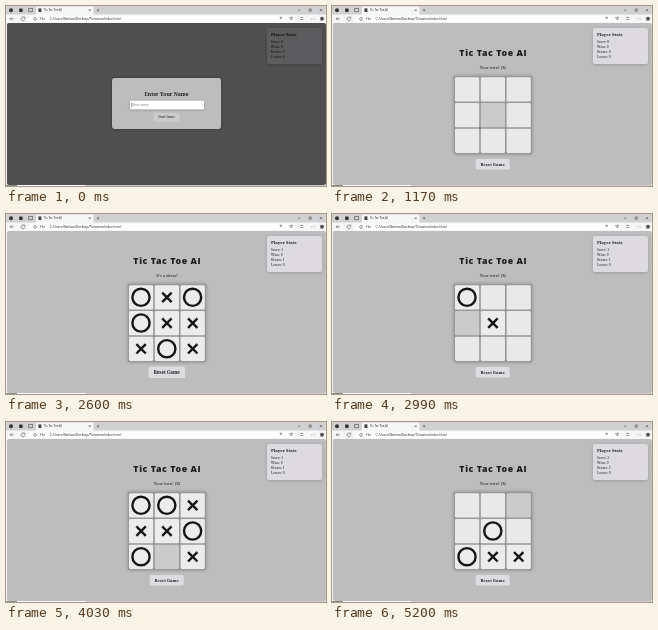
An HTML page for the animation above (5330 ms loop, 320 px wide and 180 px high).

```html
<!DOCTYPE html>
<html lang="en">
<head>
<meta charset="utf-8">
<title>Tic Tac Toe AI</title>
<style>
html, body { margin: 0; width: 100%; height: 100%; overflow: hidden; background: #d0d1d2; }
svg { display: block; width: 100vw; height: 100vh; }
text { font-family: "Noto Serif", serif; fill: #1f1f1f; white-space: pre; }
.ui { font-family: "Open Sans", sans-serif; }
.b { font-weight: 700; }
.mid { text-anchor: middle; }
.line { fill: none; stroke: #444; stroke-width: .55; }
</style>
</head>
<body>
<svg viewBox="0 0 320 180" preserveAspectRatio="none">
  <defs>
    <filter id="soft" x="-20%" y="-20%" width="140%" height="140%">
      <feDropShadow dx="0" dy=".8" stdDeviation="1.6" flood-color="#000" flood-opacity=".2"/>
    </filter>
    <filter id="glow" x="-20%" y="-20%" width="140%" height="140%">
      <feDropShadow dx="0" dy="0" stdDeviation="1.5" flood-color="#000" flood-opacity=".35"/>
    </filter>
  </defs>

  <!-- browser frame -->
  <rect width="320" height="180" fill="#d0d1d2"/>
  <path d="M0 8.5H320V180H0Z" fill="#f5f6f7"/>
  <path d="M30 9V2Q30 .5 31.5 .5H86Q87.5 .5 87.5 2V9Z" fill="#f5f6f7"/>
  <circle cx="5" cy="4.2" r="2" fill="#333"/>
  <rect x="13.2" y="2.6" width="3.4" height="3.4" rx=".6" fill="#333"/>
  <rect x="22.8" y="2.6" width="3.6" height="3.2" class="line"/>
  <rect x="32.4" y="2.4" width="3" height="3.6" fill="#444"/>
  <text class="ui" x="38" y="5.4" font-size="2.9">Tic Tac Toe AI</text>
  <path class="line" d="M82.7 3.2l2 2m0-2l-2 2M90.8 4.2h2.6m-1.3-1.3v2.6M292 4.2h2.4M303 3h2.3v2.3H303ZM313.8 3l2.4 2.4m0-2.4l-2.4 2.4"/>
  <rect x="23" y="9.7" width="266" height="6.4" rx="3.2" fill="#fff"/>
  <path class="line" d="M8 12.8H4.2m1.5-1.5l-1.5 1.5 1.5 1.5M18.7 12a1.9 1.9 0 1 0 .1 1.5m0-2.7v1.4h-1.4"/>
  <circle cx="29" cy="12.9" r="1.4" class="line"/>
  <text class="ui" x="34" y="14.2" font-size="3.2">File</text>
  <text class="ui" x="43.5" y="14.2" font-size="3.25">C:/Users/Marlow/Desktop/Tictactoe/index.html</text>
  <path class="line" d="M273.5 11.8h2.5m-1.2-1.2v2.5M283.5 11.5l2 2.5 1-3ZM294.3 11.5h3m-3 2h3M305.4 13h.6m.8 0h.6m.8 0h.6"/>
  <circle cx="316" cy="12.8" r="2" fill="#555"/>
  <rect x="1" y="17" width="319" height="162" rx="2" fill="#bdbdbd"/>
  <path d="M0 179.5H11" stroke="#8a8a8a"/>
  <path d="M11 179.5H79" stroke="#fff"/>
  <path d="M79 179.5H320" stroke="#c9cccf"/>

  <!-- statistics -->
  <rect x="261" y="22" width="55" height="36" rx="2.5" fill="#dddbe0" filter="url(#soft)"/>
  <text class="b" x="265" y="30.1" font-size="4.3">Player Stats</text>
  <g id="stats" font-size="3.25"></g>

  <g id="game">
    <text class="ui mid" x="161.3" y="49.8" font-size="8.8" font-weight="800" letter-spacing=".6">Tic Tac Toe AI</text>
    <text id="status" class="mid" x="161" y="63.3" font-size="4.05"></text>
    <rect x="121.8" y="69.8" width="78.4" height="78.4" rx="1.5" fill="#999" filter="url(#glow)"/>
    <g id="cells"></g>
    <g id="reset">
      <rect x="143.7" y="153" width="34" height="10.6" rx="1.5" fill="#dddce0"/>
      <text class="b mid" x="160.7" y="159.8" font-size="4.1">Reset Game</text>
    </g>
  </g>

  <g id="login">
    <rect x="1" y="17" width="319" height="162" rx="2" fill="#000" opacity=".58"/>
    <rect x="106" y="72" width="109" height="51" rx="3" fill="#bdbdbd" filter="url(#glow)"/>
    <text class="b mid" x="160.6" y="90.4" font-size="5.1">Enter Your Name</text>
    <rect x="124" y="94.7" width="74" height="8.6" rx="1" fill="#fff" filter="url(#soft)"/>
    <text id="name" class="ui" x="126.5" y="100.3" font-size="3.2"></text>
    <path id="caret" d="M125.8 96.8v4.6" stroke="#222" stroke-width=".5"/>
    <rect id="start" x="147.5" y="106.8" width="26" height="8.8" rx="1.2"/>
    <text class="mid" x="160.5" y="112.4" font-size="3.15">Start Game</text>
  </g>

  <g id="alert">
    <rect x="108" y="16.5" width="106" height="29.5" rx="2" fill="#fff" filter="url(#soft)"/>
    <text class="ui b" x="112" y="23.8" font-size="3.2">This page says</text>
    <text class="ui" x="112" y="30.2" font-size="2.8">Welcome, New User! Starting the game.</text>
    <rect x="194.8" y="35" width="15.4" height="7" rx="1.2" fill="#3f6084"/>
    <text class="ui mid" x="202.5" y="39.6" font-size="2.9" style="fill:#fff">OK</text>
  </g>
</svg>
<script>
const LOOP = 5330, STEP = 130;
const NAME = "New User";
const ALERT_AT = 780, GAME_AT = 1170;
const TYPED = [0, 2, 3, 5, 6, 8];

// X or O = move, h = pointer over cell, b = pointer on reset, r = new game
const script = [
  [1170, "h4"], [1300, "X4"], [1430, "O0 h8"], [1560, "X8"], [1690, "O2 h7"],
  [1820, "h1 X1"], [1950, "O7 h5"], [2080, "X5"], [2210, "O3 h6"], [2340, "X6"],
  [2470, "b"], [2730, "r"], [2860, "h4 X4"], [2990, "O0 h3"], [3120, "X3"],
  [3250, "O5"], [3380, "h2"], [3510, "X2"], [3640, "O6 h8"], [3770, "X8"],
  [3900, "O1"], [4030, "h7"], [4160, "X7"], [4290, "b"], [4550, "r"],
  [4680, "h8 X8"], [4810, "O4 h7"], [4940, "X7"], [5070, "O6"], [5200, "h2"]
];

const $ = id => document.getElementById(id);
const show = (node, on) => node.setAttribute("display", on ? "inline" : "none");

function add(parent, tag, attrs) {
  const node = document.createElementNS("http://www.w3.org/2000/svg", tag);
  for (const key in attrs) node.setAttribute(key, attrs[key]);
  return parent.appendChild(node);
}

const stats = [0, 1, 2, 3].map(i => add($("stats"), "text", { x: 265, y: 36.8 + i * 5.15 }));

const cells = Array.from({ length: 9 }, (_, i) => {
  const x = 135 + (i % 3) * 25.8, y = 83.3 + Math.floor(i / 3) * 25.7;
  const ink = { fill: "none", stroke: "#161616", "stroke-width": 2.4 };
  return {
    box: add($("cells"), "rect", { x: x - 12, y: y - 12, width: 24.2, height: 24.2, rx: 1.3 }),
    X: add($("cells"), "path", { ...ink, d: `M${x - 4.6} ${y - 4.6}l9.4 9.4m0 -9.4l-9.4 9.4` }),
    O: add($("cells"), "circle", { ...ink, cx: x, cy: y, r: 8.6 })
  };
});

function stateAt(t) {
  const s = { board: Array(9).fill(""), hover: -1, onReset: false, draws: 0, over: false };
  for (const [time, acts] of script) {
    if (time > t) break;
    for (const act of acts.split(" ")) {
      const cell = +act[1];
      if (act === "b") {
        s.onReset = true;
        s.hover = -1;
      } else if (act === "r") {
        s.board.fill("");
        s.over = false;
      } else if (act[0] === "h") {
        s.hover = cell;
        s.onReset = false;
      } else {
        s.board[cell] = act[0];
        if (s.board.every(Boolean)) {
          s.over = true;
          s.draws++;
        }
      }
    }
  }
  return s;
}

function drawLogin(t) {
  const count = TYPED[Math.min(t / STEP, TYPED.length - 1)];
  $("name").textContent = count ? NAME.slice(0, count) : "Your name";
  $("name").style.fill = count ? "#151515" : "#777";
  show($("caret"), !count);
  $("start").setAttribute("fill", t < ALERT_AT ? "#cbcbcd" : "#dcdcde");
}

function drawGame(s) {
  cells.forEach((cell, i) => {
    const mark = s.board[i];
    cell.box.setAttribute("fill", mark ? "#ececec" : i === s.hover ? "#cbcbcb" : "#e9e9e9");
    show(cell.X, mark === "X");
    show(cell.O, mark === "O");
  });
  $("status").textContent = s.over ? "It's a draw!" : "Your turn! (X)";
  const grow = s.onReset ? 1.08 : 1;
  $("reset").setAttribute("transform",
    `translate(160.7 158.3) scale(${grow}) translate(-160.7 -158.3)`);
}

function render(ms) {
  const t = Math.floor((ms % LOOP) / STEP) * STEP;
  const s = stateAt(t), playing = t >= GAME_AT;
  show($("login"), !playing);
  show($("game"), playing);
  show($("alert"), t >= ALERT_AT && !playing);
  ["Score: " + s.draws, "Wins: 0", "Draws: " + s.draws, "Losses: 0"]
    .forEach((line, i) => stats[i].textContent = line);
  if (playing) drawGame(s);
  else drawLogin(t);
}

const begin = performance.now();
function tick() {
  render(performance.now() - begin);
  requestAnimationFrame(tick);
}
tick();
</script>
</body>
</html>
```
